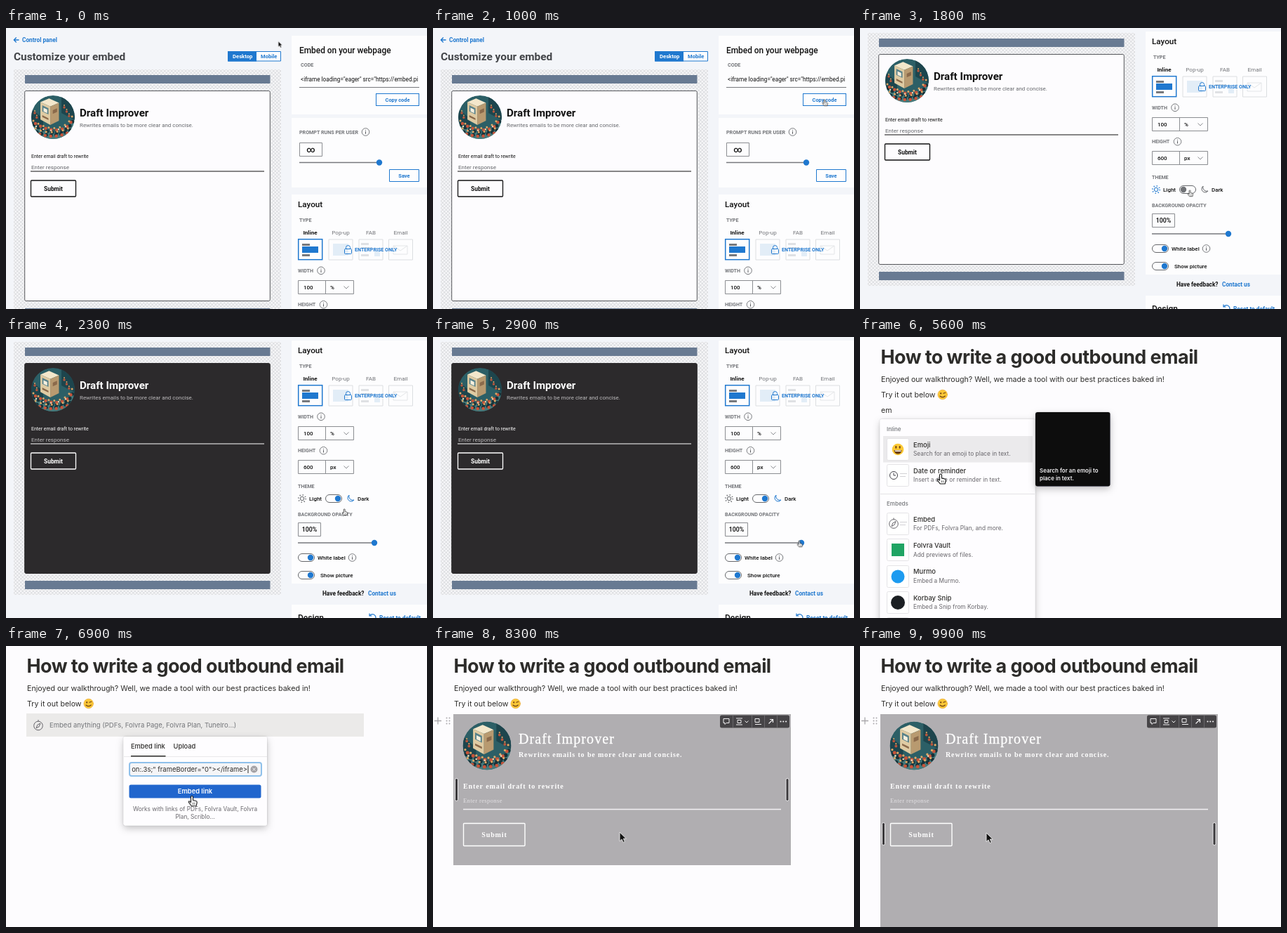
These frames come from a looping animation (600 by 400 pixels, 10000 ms). An HTML page:

```html
<!DOCTYPE html>
<html lang="en">
<head>
<meta charset="utf-8">
<title>Embed walkthrough</title>
<style>
@property --op { syntax: '<integer>'; inherits: true; initial-value: 100; }
@property --s { syntax: '<length>'; inherits: true; initial-value: 0px; }

html, body { margin: 0; width: 100%; height: 100%; overflow: hidden; background: #f3f5f9; }
svg { display: block; }
text { white-space: pre; }
.b { font-weight: 700; }
.m { font-weight: 500; }
.mid { text-anchor: middle; }
.blue { fill: #1f78cf; }
.gray { fill: #737579; }
.box { fill: #fdfdfe; stroke: #8b8d91; }
.out { fill: none; stroke: #1f78cf; }
.ln { fill: none; stroke: #77797d; }

/* settings page */
#app {
  font-family: Roboto, Arial, sans-serif; fill: #111;
  animation: scroll 10s infinite, theme 10s step-end infinite, opacity 10s linear infinite;
}
#left { transform: translateY(max(-52px, -1 * var(--s))); }
#right { transform: translateY(calc(-1 * var(--s))); }
#card { fill: var(--card); fill-opacity: calc(var(--op) / 100); stroke: var(--edge); }
.ink { fill: var(--ink); }
.soft { fill: var(--soft); }
.rule { fill: none; stroke: var(--ink); }
#sun { stroke: var(--sun); }
#moon { stroke: var(--moon); }
#switch { transform: translateX(var(--tx)); fill: var(--dot); }
#knob { transform: translateX(calc((var(--op) - 100) * 1.09px)); }
#pct { font: 500 8.8px/20px Roboto, Arial, sans-serif; text-align: center; counter-reset: n var(--op); }
#pct::after { content: counter(n) "%"; }
#copy { fill: #fdfdfe; animation: press 10s step-end infinite; }

@keyframes scroll {
  0%, 12% { --s: 0px; animation-timing-function: ease-in-out; }
  17%, 34.2% { --s: 232px; animation-timing-function: ease-in-out; }
  38.5%, 100% { --s: 514px; }
}
@keyframes opacity {
  0%, 29.2% { --op: 100; }
  31%, 31.6% { --op: 40; }
  33%, 100% { --op: 100; }
}
@keyframes theme {
  0%, 34% { --card: #fdfcfe; --edge: #55575b; --ink: #111; --soft: #66686c; --sun: #1f78cf; --moon: #66686c; --tx: 0px; --dot: #707276; }
  20% { --card: #2c2a2c; --edge: #2c2a2c; --ink: #fff; --soft: #bdbbbd; --sun: #66686c; --moon: #1f78cf; --tx: 12px; --dot: #1f78cf; }
}
@keyframes press { 0%, 9.5% { fill: #fdfdfe; } 8% { fill: #d5e6f7; } }

#ptr-a { animation: move-a 10s ease-in-out infinite; }
#ptr-a .hand { animation: hand-a 10s step-end infinite; }
#ptr-a .arrow { animation: arrow-a 10s step-end infinite; }
@keyframes move-a {
  0%, 1% { transform: translate(388px, 19px); }
  7%, 11% { transform: translate(558px, 102px); }
  16%, 21% { transform: translate(470px, 231px); }
  27%, 29.2% { transform: translate(522px, 290px); animation-timing-function: linear; }
  31%, 31.6% { transform: translate(457px, 290px); }
  33% { transform: translate(522px, 290px); }
  34%, 34.5% { transform: translate(470px, 231px); }
  38%, 100% { transform: translate(501px, 267px); }
}
@keyframes hand-a { 0%, 11.5%, 34.6% { visibility: hidden; } 6%, 15.5% { visibility: visible; } }
@keyframes arrow-a { 0%, 11.5%, 34.6% { visibility: visible; } 6%, 15.5% { visibility: hidden; } }

/* document page */
#doc { font-family: Inter, Arial, sans-serif; fill: #2d2c2a; animation: doc 10s linear infinite; }
.sub { font-size: 8.25px; fill: #67656a; letter-spacing: .03px; }
.row { font-size: 9.4px; font-weight: 500; }
.serif { font-family: "Liberation Serif", "Times New Roman", serif; fill: #fff; letter-spacing: .9px; }
@keyframes doc { 0%, 43% { opacity: 0; } 47%, 100% { opacity: 1; } }

.show { visibility: hidden; animation: 10s step-end infinite; }
#key-e { animation-name: key-e; }
#key-m { animation-name: key-m; }
#menu { animation-name: menu; }
#tip { animation-name: tip; }
#slot { animation-name: slot; }
#popup { animation-name: popup; }
#hint { animation-name: hint; }
#paste { animation-name: paste; }
#embed { animation-name: embed; }
@keyframes key-e { 0%, 61% { visibility: hidden; } 51% { visibility: visible; } }
@keyframes key-m { 0%, 61% { visibility: hidden; } 53% { visibility: visible; } }
@keyframes menu { 0%, 61% { visibility: hidden; } 52% { visibility: visible; } }
@keyframes tip { 0%, 59% { visibility: hidden; } 52% { visibility: visible; } }
@keyframes slot { 0%, 79% { visibility: hidden; } 61% { visibility: visible; } }
@keyframes popup { 0%, 74% { visibility: hidden; } 62% { visibility: visible; } }
@keyframes hint { 0%, 65% { visibility: hidden; } 62% { visibility: visible; } }
@keyframes paste { 0%, 74% { visibility: hidden; } 65% { visibility: visible; } }
@keyframes embed { 0% { visibility: hidden; } 79% { visibility: visible; } }

#pick { animation: pick 10s step-end infinite; }
@keyframes pick { 0% { transform: none; } 59% { transform: translateY(106px); } }
#pane { height: 341px; animation: grow 10s ease-in-out infinite; }
@keyframes grow { 0%, 90% { height: 215px; } 95%, 100% { height: 341px; } }
#grips { animation: grips 10s ease-in-out infinite; }
@keyframes grips { 0%, 90% { transform: translateY(-63px); } 95%, 100% { transform: none; } }

#ptr-b { animation: move-b 10s ease-in-out infinite; }
#ptr-b .hand { animation: hand-b 10s step-end infinite; }
#ptr-b .arrow { animation: arrow-b 10s step-end infinite; }
@keyframes move-b {
  0%, 48% { transform: translate(190px, 150px); }
  55%, 56% { transform: translate(115px, 195px); }
  59.5%, 61.5% { transform: translate(118px, 262px); }
  67.5%, 74% { transform: translate(265px, 213.5px); }
  79% { transform: translate(262px, 225px); }
  87%, 90% { transform: translate(270px, 305px); }
  95% { transform: translate(270px, 431px); }
  98.5%, 100% { transform: translate(180px, 266px); }
}
@keyframes hand-b { 0%, 62%, 74% { visibility: hidden; } 53%, 67% { visibility: visible; } }
@keyframes arrow-b { 0%, 62%, 74% { visibility: visible; } 53%, 67% { visibility: hidden; } }
</style>
</head>
<body>
<svg width="600" height="400" viewBox="0 0 600 400">
<defs>
  <pattern id="check" width="5" height="5" patternUnits="userSpaceOnUse">
    <path fill="#f6f6f8" d="M0 0h5v5H0z"/><path fill="#dfe0e3" d="M0 0h2.5v2.5H0zM2.5 2.5H5V5H2.5z"/>
  </pattern>
  <filter id="shade" x="-20%" y="-20%" width="140%" height="150%">
    <feDropShadow dx="0" dy="4" stdDeviation="5.5" flood-opacity=".2"/>
    <feDropShadow dx="0" dy="0" stdDeviation=".8" flood-opacity=".18"/>
  </filter>
  <clipPath id="round"><circle r="31"/></clipPath>
  <clipPath id="field"><path d="M418 60h171v22H418z"/></clipPath>

  <g id="pic" clip-path="url(#round)">
    <circle r="31" fill="#2c5f66"/>
    <path fill="#1d454d" d="M-31-12L-14 2v29h-17zM12-31h19V4L12-6z"/>
    <path fill="#447a7c" d="M-31 8L0 24 31 6v25h-62z"/>
    <g transform="translate(-3 -3) scale(.88)">
      <path fill="#f3e7cb" d="M-17-21L-3-27 13-20-1-14z"/>
      <path fill="#dfcba3" d="M-17-21l16 7v30l-16-9z"/>
      <path fill="#b89a70" d="M-1-14l14-6V9L-1 16z"/>
      <path fill="#56818a" d="M-14-16l10 5v10l-10-5z"/>
      <path fill="#f6efdd" d="M-12-12l6 3v6l-6-3z"/>
      <path fill="#8b6a4b" d="M-14 0l10 5v3l-10-5zM3-8l7-3v6L3-2z"/>
    </g>
    <g fill="none" stroke-linecap="round">
      <path stroke="#173239" stroke-width="5" stroke-dasharray="0 7" d="M-27 11Q-8 24 8 21T29 3M-23 21Q0 32 26 17"/>
      <path stroke="#c6543a" stroke-width="4.500" stroke-dasharray="0 8" d="M-25 9Q-6 20 8 18T27 4M-19 24Q2 31 22 22"/>
      <path stroke="#e0a765" stroke-width="3" stroke-dasharray="0 8" d="M-28 5Q-8 18 7 15T28-3M-25 16Q0 28 27 13"/>
      <path stroke="#e9d6b5" stroke-width="2.400" stroke-dasharray="0 11" d="M-24 13Q0 26 25 9"/>
      <path stroke="#b8553c" stroke-width="3.500" stroke-dasharray="0 7" d="M16-14L25 2M-26-6l4 9"/>
      <path stroke="#d9a263" stroke-width="2" stroke-dasharray="0 7" d="M16-17L25-1M-26-9l4 9"/>
    </g>
  </g>
  <g id="info"><circle r="5.300" fill="none" stroke="#77797d"/><path d="M0-2.800v1M0-.800v3.600" stroke="#55575b"/></g>
  <path id="chev" d="M-3.500-1.500L0 2l3.500-3.500" fill="none" stroke="#8b8d91"/>
  <g id="on"><rect x=".5" y=".5" width="23" height="11" rx="5.500" fill="#fdfdfe" stroke="#66686c"/><circle cx="18" cy="6" r="4.200" class="blue"/></g>
  <g id="unit"><path class="box" d="M416.500.500h79v19h-79zM455.500.500v19"/><use href="#chev" x="485" y="10"/></g>
  <g id="select">
    <rect x="416.500" y=".5" width="174" height="18" rx="1.500" fill="#fdfdfe" stroke="#c4c6ca"/>
    <path d="M572.500 4v11" stroke="#c4c6ca"/><use href="#chev" x="581" y="9.500"/>
    <text x="421" y="12.500" font-size="7.800">Mild Text Pro</text>
  </g>
  <g id="compass" fill="none" stroke="#66646a"><circle r="6.300"/><path d="M3-3.500L1.200 1.200-3 3.500-1.200-1.200zM0-8.500v2"/></g>
  <g id="tile"><rect x="38.500" y=".5" width="31" height="31" rx="2" fill="#fff" stroke="#e4e3e6"/></g>
  <path id="lines" d="M57-2.500h10M57 1.500h8" stroke="#d2d1d5"/>
  <path id="arrow" d="M0 0v12.600l3-2.700 2.100 4.600 2.200-1-2-4.500h4z" fill="#111" stroke="#fff" stroke-width=".8"/>
  <g id="hand"><path d="M-1.500 1.500a1.500 1.500 0 0 1 3 0V6l4.200 1q1.700.500 1.500 2.300L6.200 14h-7L-4.600 9q-.400-1.800 1.400-1.300L-1.500 9z" fill="#fff" stroke="#111" stroke-width="1.100"/><path d="M1.500 9.300V12M3.800 9.300V12" stroke="#111" stroke-width=".7"/></g>
</defs>

<g id="app">
  <rect width="600" height="400" fill="#f3f5f9"/>

  <g id="left">
    <path d="M18.500 17H11.500M14.700 13.500L11.300 17l3.400 3.500" class="out" stroke-width="1.300"/>
    <text x="23" y="20" font-size="8.300" class="b blue">Control panel</text>
    <text x="11" y="46" font-size="15.400" class="b" fill="#434549">Customize your embed</text>
    <path d="M316.500 33.500h75v13.500h-75z" fill="#fdfdfe" stroke="#1f78cf"/>
    <path d="M316 33h41v14.500h-41z" class="blue"/>
    <text x="323" y="43" font-size="7.700" class="b" fill="#fff">Desktop</text>
    <text x="363" y="43" font-size="7.600" class="b blue">Mobile</text>

    <rect x="11" y="59" width="381" height="360" fill="url(#check)"/>
    <path fill="#687a92" d="M27 67h349.500v12H27zM27 399h349.500v12H27z"/>
    <rect id="card" x="26.700" y="89.500" width="349.600" height="299" rx="2"/>
    <use href="#pic" x="67" y="127"/>
    <text x="105" y="126" font-size="15.100" class="b ink">Draft Improver</text>
    <text x="105" y="140.500" font-size="7.950" class="soft">Rewrites emails to be more clear and concise.</text>
    <text x="36" y="185" font-size="6.950" class="ink">Enter email draft to rewrite</text>
    <text x="36" y="201" font-size="8.100" class="soft">Enter response</text>
    <path d="M35 204h333" class="rule" stroke-width="1.200"/>
    <rect x="35.500" y="217" width="64" height="23" rx="1" class="rule" stroke-width="1.300"/>
    <text x="67.500" y="231.500" font-size="8.400" class="b ink mid">Submit</text>
  </g>

  <g id="right">
    <path fill="#fdfdfe" d="M407 11h193v112H407zM407 128h193v99H407zM407 237h193v346H407zM407 613h193v400H407z"/>
    <text x="418" y="36" font-size="11.900" class="m">Embed on your webpage</text>
    <text x="420" y="55" font-size="7.200" class="b gray">CODE</text>
    <text x="420" y="76" font-size="8.200" clip-path="url(#field)">&lt;iframe loading="eager" src="https://embed.pi</text>
    <path d="M418 84.500h171" class="ln"/>
    <rect id="copy" x="527.500" y="93.500" width="61" height="17" stroke="#1f78cf"/>
    <text x="558" y="105" font-size="7.400" class="b blue mid">Copy code</text>

    <text x="418" y="150.500" font-size="7.150" class="b gray">PROMPT RUNS PER USER</text>
    <use href="#info" x="512.500" y="148"/>
    <path d="M418.500 163.500h32v19h-32z" class="box"/>
    <text x="434.500" y="177" font-size="12" class="m mid">∞</text>
    <path d="M418 191.500h114" class="ln" stroke-width="1.500"/><circle cx="532" cy="191.500" r="4.200" class="blue"/>
    <path d="M546.500 201.500h42v17h-42z" class="out"/>
    <text x="567.500" y="212.500" font-size="7.500" class="b blue mid">Save</text>

    <text x="416" y="255" font-size="11.700" class="m">Layout</text>
    <text x="418" y="276" font-size="7.100" class="b gray">TYPE</text>
    <g font-size="8.100" class="mid">
      <text x="433.500" y="293.500" class="b">Inline</text>
      <g class="gray"><text x="477" y="293.500">Pop-up</text><text x="520" y="293.500">FAB</text><text x="562.500" y="293.500">Email</text></g>
    </g>
    <rect x="416.700" y="300.700" width="34" height="29" fill="#fdfdfe" stroke="#1f78cf" stroke-width="1.500"/>
    <path fill="#77797d" d="M422 307h11v3h-11zM422 322h11v3h-11z"/><path class="blue" d="M422 311h23v9h-23z"/>
    <path d="M460 301h34v29h-34zM503 301h34v29h-34zM545.500 301h34v29h-34z" fill="none" stroke="#dcdee1"/>
    <path fill="#e2edf7" d="M466 307h22v17h-22zM525 317h8v8h-8z"/>
    <path fill="#dfe1e4" d="M506 306h11v3h-11zM506 312h16v2h-16zM506 322h11v3h-11z"/>
    <path d="M552 310h20v12h-20l0-12l10 7l10-7" fill="none" stroke="#e4e6e8"/>
    <rect x="482.500" y="314.500" width="10" height="7" rx="1" class="out"/><path d="M484.500 314v-1.500a3 3 0 0 1 6 0v1.500" class="out"/>
    <text x="497" y="318.300" font-size="7.100" class="b blue">ENTERPRISE ONLY</text>

    <g font-size="7.100" class="b gray">
      <text x="416" y="348">WIDTH</text><text x="416" y="396.300">HEIGHT</text>
      <text x="416" y="446.500">THEME</text><text x="416" y="487">BACKGROUND OPACITY</text>
    </g>
    <use href="#info" x="449" y="345.300"/><use href="#info" x="452.500" y="393.700"/>
    <use href="#unit" y="359"/><use href="#unit" y="407"/>
    <g font-size="8" class="m">
      <text x="424" y="372">100</text><text x="462" y="372">%</text>
      <text x="424" y="420">600</text><text x="462" y="420">px</text>
      <text x="432" y="465">Light</text><text x="501" y="465">Dark</text>
      <text x="444" y="549">White label</text><text x="448" y="574">Show picture</text>
    </g>
    <g id="sun" fill="none"><circle cx="422" cy="462" r="2.700"/><circle cx="422" cy="462" r="5.200" stroke-dasharray="1.200 2.884" stroke-width="1.800"/></g>
    <rect x="455.500" y="456.500" width="23" height="11" rx="5.500" fill="#fdfdfe" stroke="#66686c"/>
    <circle id="switch" cx="461" cy="462" r="4.200"/>
    <path id="moon" d="M489 457a5 5 0 1 0 7 7a5.500 5.500 0 0 1-7-7z" fill="none"/>
    <path d="M416.500 496.500h32v19h-32z" class="box"/>
    <foreignObject x="416" y="496" width="33" height="20"><div id="pct"></div></foreignObject>
    <path d="M416 525h109" class="ln" stroke-width="1.300"/><circle id="knob" cx="525" cy="525" r="4.200" class="blue"/>
    <use href="#on" x="416" y="540"/><use href="#on" x="416" y="565"/>
    <use href="#info" x="493.500" y="546"/>

    <text x="451" y="600" font-size="8.300" class="b">Have feedback?</text>
    <text x="516" y="600" font-size="8.250" class="b blue">Contact us</text>

    <text x="416" y="635.500" font-size="12" class="m">Design</text>
    <path d="M518.500 628.500a4.700 4.700 0 1 1-.800 4M518 625.500v3.500h3.500" class="out" stroke-width="1.200"/>
    <text x="532" y="634.500" font-size="8.300" class="b blue">Reset to default</text>
    <g font-size="7.900" class="b gray">
      <text x="417" y="658">HEADER</text><text x="417" y="703">BODY</text>
      <text x="417" y="748">LABELS</text><text x="417" y="793">BUTTON</text>
    </g>
    <use href="#select" y="667"/><use href="#select" y="712"/><use href="#select" y="757"/><use href="#select" y="802"/>
    <g font-size="7.100" class="b mid"><text x="503" y="844.500">MORE CUSTOMIZATION</text><text x="503" y="854.500">COMING SOON</text></g>
  </g>

  <g id="ptr-a"><g transform="scale(.62)"><use href="#arrow" class="arrow"/><use href="#hand" class="hand"/></g></g>
</g>

<g id="doc">
  <rect width="600" height="400" fill="#fdfcfe"/>
  <text x="29.500" y="37.700" font-size="26.900" letter-spacing="-.54" class="b">How to write a good outbound email</text>
  <text x="30" y="63.500" font-size="10.650">Enjoyed our walkthrough? Well, we made a tool with our best practices baked in!</text>
  <text x="30" y="86" font-size="10.600">Try it out below</text>
  <g transform="translate(117.700 82)" fill="none" stroke="#6b3d12" stroke-width="1.100" stroke-linecap="round">
    <circle r="6.800" fill="#fbc737" stroke="#e9a52c" stroke-width=".6"/>
    <path d="M1-1.800l3.200-.900M-3.800 2q3.800 3.400 7.400 0"/><ellipse cx="-2.500" cy="-1.800" rx=".9" ry="1.300" fill="#6b3d12" stroke="none"/>
  </g>

  <g font-size="10.600"><text id="key-e" class="show" x="30" y="108">e</text><text id="key-m" class="show" x="36.300" y="108">m</text></g>

  <g id="menu" class="show">
    <rect x="28.500" y="117" width="221" height="320" rx="3" fill="#fefdff" filter="url(#shade)"/>
    <path id="pick" d="M33 141h213v37.500H33z" fill="#ebeaec"/>
    <g font-size="8" class="m gray"><text x="38" y="134">Inline</text><text x="38" y="240">Embeds</text></g>
    <path d="M29 223.500h220" stroke="#e4e3e6"/>
    <use href="#tile" y="144"/><use href="#tile" y="181"/><use href="#tile" y="250"/><use href="#tile" y="287"/>
    <use href="#tile" y="325"/><use href="#tile" y="362"/><use href="#tile" y="399"/>
    <circle cx="54" cy="160" r="8.300" fill="#fcc934"/><path d="M48.500 161h11a5.500 5.500 0 0 1-11 0z" fill="#6b3d12"/><path d="M49.500 161.500h9v1.500h-8.500z" fill="#fff"/>
    <path d="M51.300 156v1.800M56.700 156v1.800" stroke="#6b3d12" stroke-width="2" stroke-linecap="round"/>
    <g fill="none" stroke="#44434a"><circle cx="48" cy="197" r="5.500"/><path d="M48 193.500v3.500h3"/></g>
    <use href="#lines" y="197"/><use href="#lines" y="266"/>
    <use href="#compass" x="48" y="266"/>
    <rect x="45" y="294" width="18" height="18" fill="#1fa463"/>
    <circle cx="54" cy="341" r="9.500" fill="#1d9bf0"/><circle cx="54" cy="378" r="10" fill="#1b1f23"/>
    <g class="row">
      <text x="76" y="156.500">Emoji</text><text x="76" y="194">Date or reminder</text><text x="76" y="262.500">Embed</text>
      <text x="76" y="300">Folvra Vault</text><text x="76" y="337">Murmo</text><text x="76" y="374.500">Korbay Snip</text>
    </g>
    <g class="sub">
      <text x="76" y="169">Search for an emoji to place in text.</text><text x="76" y="206">Insert a date or reminder in text.</text>
      <text x="76" y="275">For PDFs, Folvra Plan, and more.</text><text x="76" y="312.500">Add previews of files.</text>
      <text x="76" y="349.500">Embed a Murmo.</text><text x="76" y="387">Embed a Snip from Korbay.</text>
    </g>
    <g id="tip" class="show">
      <rect x="250" y="107" width="106.500" height="105.500" rx="3" fill="#0d0c0e" filter="url(#shade)"/>
      <g fill="#f2f1f3" font-size="7.950" font-weight="600"><text x="256" y="193">Search for an emoji to</text><text x="256" y="204">place in text.</text></g>
    </g>
  </g>

  <g id="slot" class="show">
    <path d="M29 96h481v33H29z" fill="#ebeae9"/>
    <use href="#compass" x="46" y="113.500"/>
    <text x="62" y="116" font-size="9.500" class="gray">Embed anything (PDFs, Folvra Page, Folvra Plan, Tunelro…)</text>
  </g>

  <g id="popup" class="show">
    <rect x="167.500" y="129" width="204.500" height="126.500" rx="3" fill="#fefdff" filter="url(#shade)"/>
    <path d="M168 157.500h204" stroke="#e9e8ea"/><path d="M178 156.700h49.500" stroke="#2d2c2a" stroke-width="1.500"/>
    <g font-size="9.300" class="m"><text x="178" y="146">Embed link</text><text x="238.500" y="146">Upload</text></g>
    <rect x="176" y="166" width="188" height="19" rx="3" fill="#f5f5f7" stroke="#8fc0ea" stroke-width="2"/>
    <text id="hint" class="show" x="181" y="179" font-size="9.200" fill="#aaa8ad">Paste in https://…</text>
    <g id="paste" class="show">
      <text x="344" y="179" font-size="9.450" text-anchor="end">on:.3s;" frameBorder="0"&gt;&lt;/iframe&gt;</text>
      <path d="M345 170v11" stroke="#2d2c2a"/>
      <circle cx="353.500" cy="175.500" r="5" fill="#a3a1a5"/><path d="M351.600 173.600l3.800 3.800m0-3.800l-3.800 3.800" stroke="#fff"/>
    </g>
    <rect x="175.500" y="197.500" width="188" height="19" rx="2.500" fill="#2166cd"/>
    <text x="269.500" y="210.300" font-size="9.300" font-weight="600" class="mid" fill="#fff">Embed link</text>
    <g class="sub mid"><text x="269.500" y="235">Works with links of PDFs, Folvra Vault, Folvra</text><text x="269.500" y="246">Plan, Scriblo…</text></g>
  </g>

  <g id="embed" class="show">
    <rect id="pane" x="29" y="97" width="481" fill="#b0aeb1"/>
    <path d="M7 101.500v10M2 106.500h10" stroke="#aaa8ac" stroke-width="1.300"/>
    <path d="M19.500 102.500v9M23.500 102.500v9" stroke="#aaa8ac" stroke-width="2" stroke-linecap="round" stroke-dasharray="0 4"/>
    <use href="#pic" transform="translate(77 142) scale(1.110)"/>
    <g class="serif">
      <text x="122" y="139" font-size="20" style="letter-spacing:1.1px" stroke="#fff" stroke-width=".3">Draft Improver</text>
      <g font-size="10" class="b">
        <text x="122" y="158">Rewrites emails to be more clear and concise.</text>
        <text x="43" y="203">Enter email draft to rewrite</text>
        <text x="87.500" y="271.500" class="mid">Submit</text>
      </g>
      <text x="43" y="223" font-size="8.500" style="letter-spacing:.4px" fill="#e3e1e4">Enter response</text>
    </g>
    <path d="M43 232.500h453" stroke="#f1f0f2" stroke-width="1.300"/>
    <rect x="43.500" y="252.500" width="87.500" height="32" rx="1" fill="none" stroke="#fff" stroke-width="1.400"/>
    <g id="grips" fill="#3b393c" stroke="#e9e8ea">
      <rect x="31.500" y="251.500" width="4" height="32" rx="2"/><rect x="503" y="251.500" width="4" height="32" rx="2"/>
    </g>
    <rect x="409" y="98.500" width="99" height="18" rx="2.500" fill="#464447"/>
    <path d="M427.500 99v17M454.500 99v17M472.500 99v17M490.500 99v17" stroke="#68666a"/>
    <g fill="none" stroke="#f1f0f2">
      <path d="M414 103.500h8v6h-4l-2 2v-2h-2zM432 103h9M432 112h9M434 105.500h5v4h-5zM444.500 106.500l2.500 2.500 2.500-2.500M459 103.500h6v5h-6zM459 111.500h9"/>
      <path d="M478.500 110.500l6-6M480 104.500h4.500v4.500" stroke-width="1.200"/>
      <path d="M495.500 107.500h8" stroke-width="2.200" stroke-linecap="round" stroke-dasharray="0 3.800"/>
    </g>
  </g>

  <g id="ptr-b"><use href="#arrow" class="arrow"/><use href="#hand" class="hand"/></g>
</g>
</svg>
</body>
</html>
```
